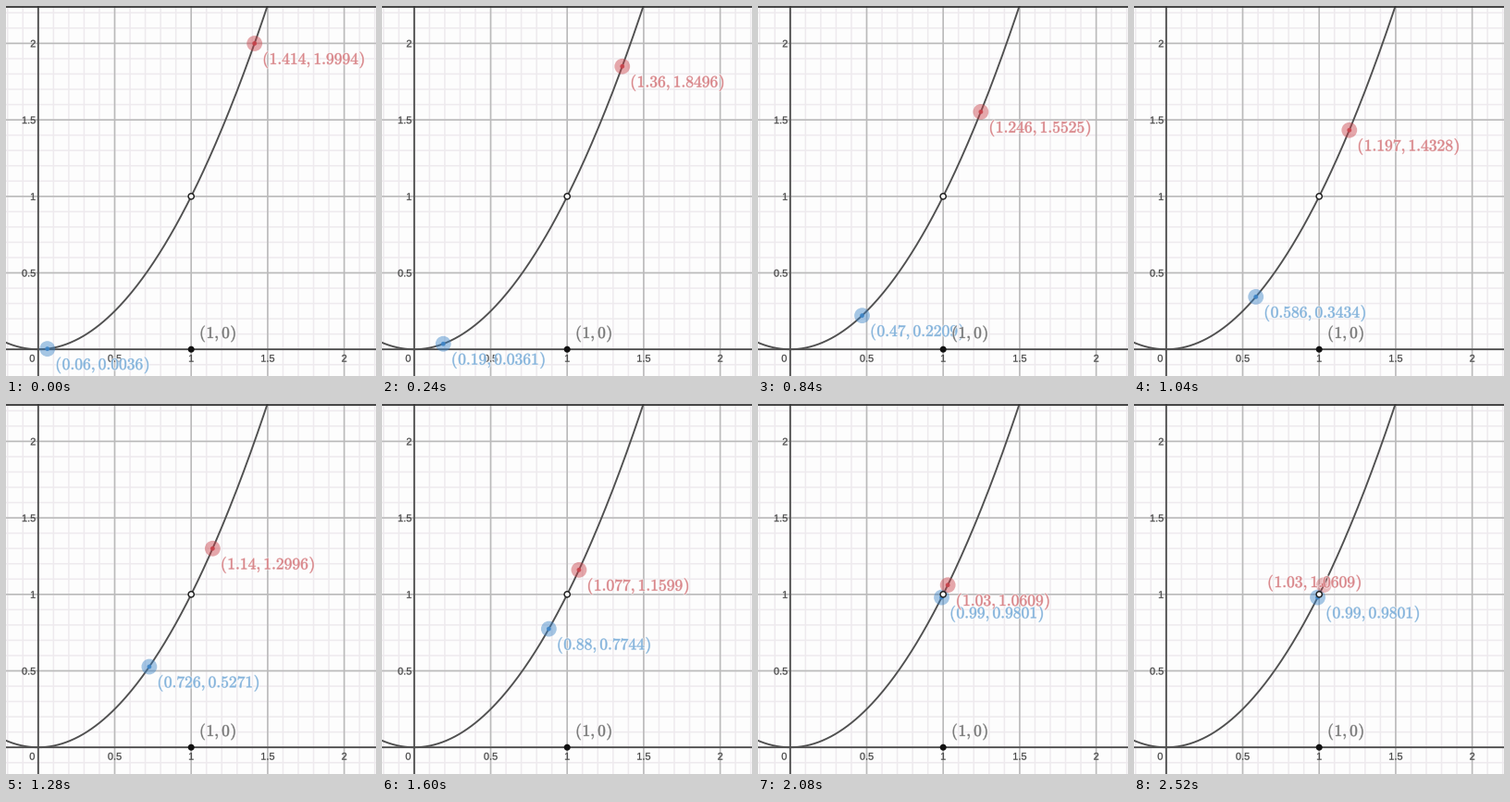
Recreate the animation shown at these times as a matplotlib script. Size 400x400 px, loop 2560 ms.

```python
import numpy as np
import matplotlib.pyplot as plt
from matplotlib.animation import FuncAnimation
from matplotlib.patches import Circle
from matplotlib.patheffects import Stroke, withStroke

plt.rcParams["mathtext.fontset"] = "cm"

SIZE, DPI = 400, 100
FRAMES, INTERVAL = 64, 40
PT = 72 / DPI                       # points per pixel
X0, Y0, UNIT = 34.8, 371.2, 165.4   # origin and scale of the plot, in pixels

RED, RED_TEXT = "#c9424a", "#d9868a"
BLUE, BLUE_TEXT = "#3d85c8", "#85b4dc"
GREY_TEXT = "#777777"

# Frames at which the points advance, and the x values after some advances
ADVANCES = [1, 2, 4, 5, 7, 8, 10, 11, 13, 15, 17, 19, 21, 22, 24, 26, 27,
            29, 30, 32, 34, 35, 36, 38, 40, 41, 42, 44, 45, 46, 48, 49, 50, 52]
KEY_STEPS = [0, 8, 9, 13, 17, 20, 25, 27, 34]
KEY_BLUE = [0.06, 0.32, 0.35, 0.47, 0.625, 0.726, 0.88, 0.945, 0.99]
KEY_RED = [1.414, 1.306, 1.294, 1.246, 1.181, 1.14, 1.077, 1.05, 1.03]
LABEL_FLIP = 61

fig = plt.figure(figsize=(SIZE / DPI, SIZE / DPI), dpi=DPI, facecolor="#fdfdfd")
ax = fig.add_axes([0, 0, 1, 1])
ax.set(xlim=(0, SIZE), ylim=(SIZE, 0))
ax.axis("off")


def px(x):
    return X0 + UNIT * x


def py(y):
    return Y0 - UNIT * y


def line(xs, ys, color, width, z):
    ax.plot(xs, ys, color=color, lw=width * PT, zorder=z,
            solid_capstyle="butt", snap=False)


def grid(step, color, width, z):
    for k in range(-4, 30):
        v = k * step
        if px(v) <= SIZE:
            line([px(v)] * 2, [0, SIZE], color, width, z)
        if py(v) >= 0:
            line([0, SIZE], [py(v)] * 2, color, width, z)


def tick(x, y, text, ha="center"):
    ax.text(x, y, text, family="Liberation Sans", size=11 * PT, color="#484848",
            ha=ha, va="center_baseline", zorder=4,
            path_effects=[withStroke(linewidth=0.8 * PT, foreground="#484848",
                                     alpha=0.25)])


def label(x, y, text, color):
    soft = [Stroke(linewidth=2.5 * PT, foreground="white", alpha=0.5),
            withStroke(linewidth=1.1 * PT, foreground=color, alpha=0.35)]
    return ax.text(x, y, text, size=17.5 * PT, color=color, ha="left",
                   va="baseline", zorder=10, path_effects=soft)


def number(v):
    return f"{v:.4f}".rstrip("0").rstrip(".")


def coords(x, y):
    return rf"$(\hspace{{0.04}}{number(x)}, {number(y)}\hspace{{0.04}})$"


class Point:
    """A point on the curve with a soft halo and a coordinate label."""

    def __init__(self, color, text_color):
        self.halo = Circle((0, 0), 8.4, fc=color, lw=0, alpha=0.46, zorder=6)
        self.dot = Circle((0, 0), 2.4, fc=color, lw=0, alpha=0.9, zorder=7)
        ax.add_patch(self.halo)
        ax.add_patch(self.dot)
        self.label = label(0, 0, "", text_color)

    def move(self, x):
        x = round(float(x), 3)
        cx, cy = px(x), py(x * x)
        self.halo.center = self.dot.center = (cx, cy)
        self.label.set_text(coords(x, x * x))
        self.label.set_position((cx + 8.5, cy + 22.2))


grid(0.1, "#eeeaee", 1.5, 1)
grid(0.5, "#bababa", 1.6, 2)
line([0, SIZE], [py(0)] * 2, "#4c4c4c", 1.8, 3)
line([px(0)] * 2, [0, SIZE], "#4c4c4c", 1.8, 3)
line([0, SIZE], [1, 1], "#333333", 1.8, 12)

tick(28.3, 380.6, "0")
for v in (0.5, 1, 1.5, 2):
    tick(px(v), 380.6, f"{v:g}")
    tick(32.2, py(v), f"{v:g}", "right")

xs = np.linspace(-0.25, 1.55, 200)
line(px(xs), py(xs ** 2), "#505050", 1.9, 5)
ax.add_patch(Circle((px(1), py(0)), 3.5, fc="#111111", lw=0, zorder=8))
ax.add_patch(Circle((px(1), py(1)), 3.1, fc="white", ec="#222222",
                    lw=1.5 * PT, zorder=8))

blue = Point(BLUE, BLUE_TEXT)
red = Point(RED, RED_TEXT)
label(209.0, 358.8, coords(1, 0), GREY_TEXT)


def update(frame):
    step = sum(a <= frame for a in ADVANCES)
    blue.move(np.interp(step, KEY_STEPS, KEY_BLUE))
    red.move(np.interp(step, KEY_STEPS, KEY_RED))
    flipped = frame >= LABEL_FLIP
    red.halo.set_alpha(0.35 if flipped else 0.46)
    if flipped:
        red.label.set_position((144, 198))
    return []


anim = FuncAnimation(fig, update, frames=FRAMES, interval=INTERVAL,
                     init_func=lambda: update(0), repeat=True, repeat_delay=0)
plt.show()
```
